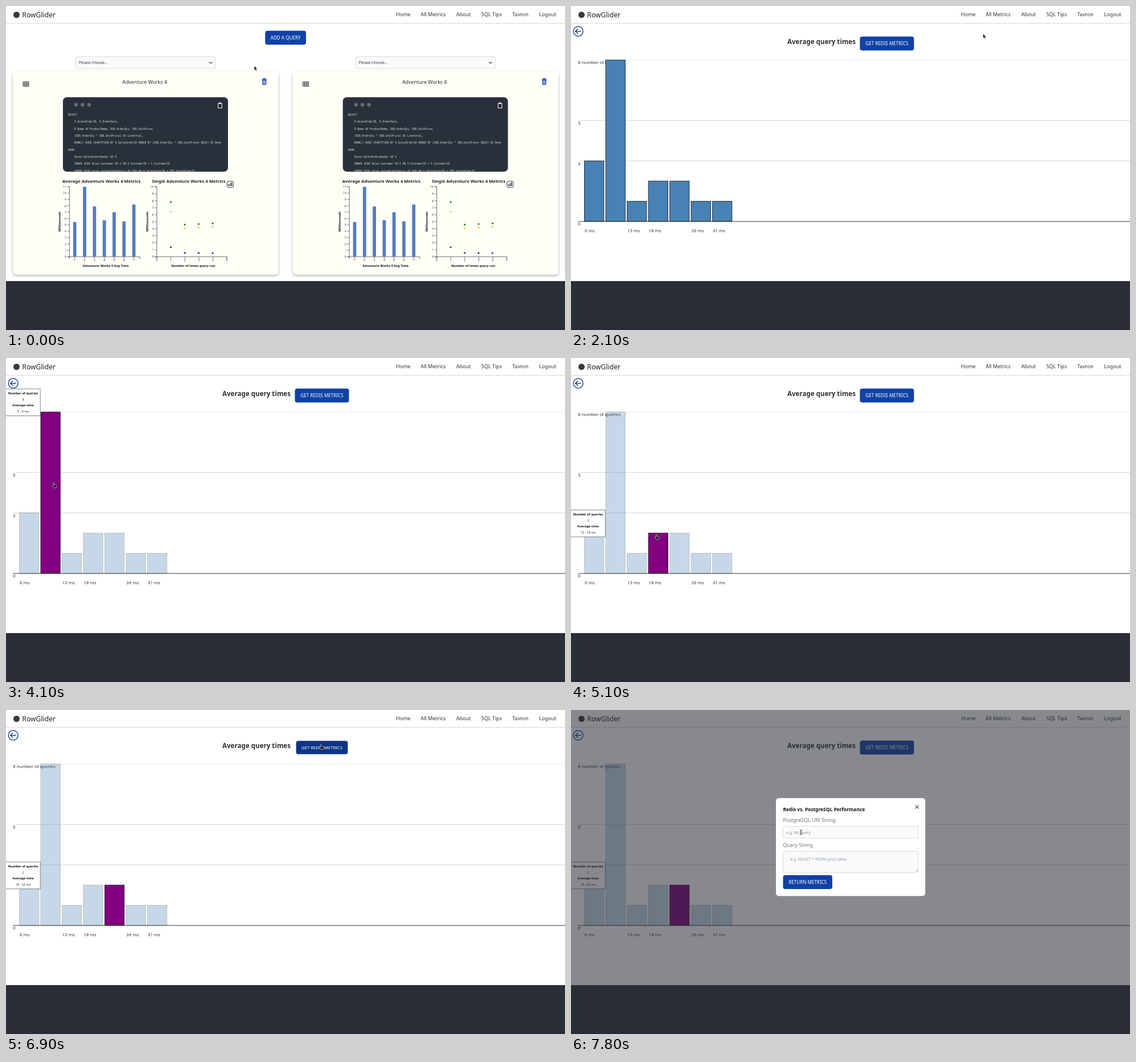
These frames come from a looping animation (982x570 px, 8 s). An HTML page:

```html
<!DOCTYPE html>
<html lang="en">
<head>
<meta charset="utf-8">
<title>Query metrics</title>
<style>
  html, body { margin: 0; height: 100%; overflow: hidden; background: #fff; }
  svg { display: block; width: 982px; height: 570px; }
  text { font-family: "Noto Sans", "Open Sans", sans-serif; white-space: pre; }
  .code { font-family: "Liberation Mono", "Noto Sans Mono", monospace; }
  .tick { font-family: "Open Sans", sans-serif; }
</style>
</head>
<body>
<svg id="stage" viewBox="0 0 982 570"></svg>
<script>
const LOOP = 8000, BLUE = '#1041a6', INK = '#2d3138';

// Markup helpers
const text = (x, y, s, size, { fill = INK, weight = 400, anchor = 'start', more = '' } = {}) =>
  `<text x="${x}" y="${y}" font-size="${size}" fill="${fill}" font-weight="${weight}" text-anchor="${anchor}" ${more}>${s}</text>`;
const mid = (x, y, s, size, o = {}) => text(x, y, s, size, { anchor: 'middle', ...o });
const rect = (x, y, w, h, fill, more = '') =>
  `<rect x="${x}" y="${y}" width="${w}" height="${h}" fill="${fill}" ${more}/>`;
const path = (d, stroke = INK, width = 1, more = '') =>
  `<path d="${d}" fill="none" stroke="${stroke}" stroke-width="${width}" ${more}/>`;
const dot = (x, y, r, fill) => `<circle cx="${x}" cy="${y}" r="${r}" fill="${fill}"/>`;
const group = (id, body, more = '') => `<g id="${id}" ${more}>${body}</g>`;
const range = n => [...Array(n).keys()];
const button = (x, y, w, label) =>
  rect(x, y, w, 24.5, BLUE, 'rx="4"') +
  mid(x + w / 2, y + 15.3, label, 8.1, { fill: '#fff', weight: 500 });
const field = (x, y, w, h) => rect(x, y, w, h, '#f9fafb', 'rx="3" stroke="#d1d5db" stroke-width=".8"');

// Dashboard
const SQL = [
  'SELECT', '>S.SalesOrderID, S.OrderDate,',
  '>P.Name AS ProductName, SOD.OrderQty, SOD.UnitPrice,',
  '>(SOD.OrderQty * SOD.UnitPrice) AS LineTotal,',
  '>RANK() OVER (PARTITION BY S.SalesOrderID ORDER BY (SOD.OrderQty * SOD.UnitPrice) DESC) AS Rank',
  'FROM', '>Sales.SalesOrderHeader AS S',
  '>INNER JOIN Sales.Customer AS C ON S.CustomerID = C.CustomerID',
  '>INNER JOIN Sales.SalesOrderDetail AS SOD ON S.SalesOrderID = SOD.SalesOrderID'
];

function axes(x0, x1, yMax, xs, firstLabel) {
  const step = 123 / yMax;
  let out = path(`M${x0 - 4} 318H${x0}V441H${x0 - 4}M${x0} 445V441H${x1}V445`, '#333', .7);
  for (const i of range(yMax + 1)) {
    const y = 441 - i * step;
    out += path(`M${x0 - 4} ${y}H${x0}`, '#333', .6) +
      text(x0 - 5.5, y + 2, i, 5.2, { anchor: 'end', more: 'class="tick"' });
  }
  xs.forEach((x, i) => {
    out += path(`M${x} 441V445`, '#333', .6) + mid(x, 449.3, i + firstLabel, 5.2, { more: 'class="tick"' });
  });
  return out;
}

function axisNames(x, yLabelX, label) {
  const bold = { weight: 700, fill: '#111' };
  return mid(x, 458.7, label, 5.65, bold) +
    mid(0, 0, 'Milliseconds', 5.7, { ...bold, more: `transform="translate(${yLabelX} 379.5) rotate(-90)"` });
}

function card() {
  const barX = range(7).map(i => 120.8 + 17.3 * i);
  const bars = [5.45, 11, 7.9, 5.73, 6.98, 5.55, 8.2];
  const runs = [['green', 345, 384.5, 383.5, 382.5], ['#f5c40f', 361.5, 391, 389.5, 388.5],
    ['#1041a6', 424.5, 434.3, 434.7, 434.8]];
  const heading = { weight: 600, fill: '#222' };
  return field(122.5, 89, 245.5, 21) + text(128, 102, 'Please choose...', 6.8) +
    path('M357 98.3l2.6 2.6 2.6-2.6', '#444', 1.2) +
    rect(12, 115, 467, 357.5, '#fffff7', 'rx="7" filter="url(#shadow)"') +
    path('M30 133.5h10v7.8h-10zM30 136h10M30 138.6h10M33.3 133.5v7.8M36.7 133.5v7.8', '#333', 1) +
    mid(243.5, 136.5, 'Adventure Works 4', 8.8) +
    path('M449.3 129.6h9M452 129v-1h3.6v1', BLUE, 1.3) +
    path('M450.8 131.4h6l-.5 6.3h-5z', BLUE, 1.4) + path('M453 131v6M454.8 131v6', BLUE, .7) +
    rect(100, 160.5, 290, 131, '#2a303a', 'rx="7"') +
    [123, 134.5, 146].map(x => dot(x, 173.7, 3.2, '#666b74')).join('') +
    path('M372.7 171.3h6.6v8.2h-6.6z', '#fff', 1, 'stroke-linejoin="round"') +
    rect(374.3, 169.8, 3.4, 2.4, '#fff', 'rx=".6"') +
    `<g clip-path="url(#codeBox)">` + SQL.map((s, i) =>
      text(s[0] === '>' ? 120 : 108.8, 193 + i * 12.32, s.replace('>', ''), 4.59,
        { fill: '#e3e5e8', more: 'class="code"' })).join('') + '</g>' +
    mid(167.7, 311, 'Average Adventure Works 4 Metrics', 7.7, heading) +
    axes(111.5, 235, 11, barX, 1) +
    bars.map((v, i) => rect(barX[i] - 2.9, 441 - v * 11.18, 5.8, v * 11.18, '#557cc0')).join('') +
    axisNames(175, 96.3, 'Adventure Works 4 Avg Time') +
    mid(321, 311, 'Single Adventure Works 4 Metrics', 7.7, heading) +
    axes(265, 388, 10, range(6).map(i => 265 + 24.6 * i), 0) +
    runs.map(([c, ...ys]) => ys.map((y, i) => dot(289.5 + 24.5 * i, y, 1.6, c)).join('')).join('') +
    axisNames(329, 249.7, 'Number of times query run') +
    rect(388.4, 308.3, 11, 11, '#fff', 'rx="2.5" stroke="#333"') +
    path('M391.3 317v-3.5M393.9 317v-5M396.5 317v-7', '#222', 1.4);
}

const dashboard = group('dashboard', button(455.3, 43.4, 71.7, 'ADD A QUERY') +
  group('card', card()) + '<use href="#card" x="491.7"/>');

// Histogram page
const COUNTS = [3, 8, 1, 2, 2, 1, 1], UNIT = 35.5, BASE = 379;
const gridLabels = [[8, '8 number of queries'], [5, '5'], [3, '3'], [0, '0']];
const timeLabels = [[0, '0 ms'], [2, '13 ms'], [3, '18 ms'], [5, '26 ms'], [6, '31 ms']];

const tooltip = group('tip',
  rect(-1, .3, 61.2, 47.4, '#fff', 'stroke="#777" stroke-width=".9"') +
  mid(30, 9.9, 'Number of queries', 5.6, { weight: 700, fill: '#111' }) +
  mid(30, 21.2, '', 5.6, { more: 'id="tipCount"' }) +
  mid(30, 30.5, 'Average time', 5.6, { weight: 700, fill: '#111' }) +
  mid(30, 42, '', 5.6, { more: 'id="tipTime"' }));

const metrics = group('metrics',
  `<circle cx="12.7" cy="44.5" r="8.5" fill="none" stroke="${BLUE}" stroke-width="1.4"/>` +
  path('M18 44.5H8M12 40.3L7.8 44.5L12 48.7', BLUE, 1.4) +
  text(380, 67, 'Average query times', 11.6, { weight: 600 }) +
  group('redis', button(507.5, 53.8, 95, 'GET REDIS METRICS')) +
  gridLabels.map(([n, s]) => {
    const y = BASE - n * UNIT;
    return (n ? path(`M12.5 ${y}H982`, n === 8 ? '#ebebeb' : '#dadada', 1) : '') +
      text(12.3, y + 7, s, 7.8);
  }).join('') +
  timeLabels.map(([i, s]) => text(24 + 37.5 * i, 398.3, s, 7.8)).join('') +
  COUNTS.map((n, i) => rect(23.5 + 37.5 * i, BASE - n * UNIT, 34.3, n * UNIT, 'steelblue',
    'class="bar" stroke="#222" stroke-width=".9"')).join('') +
  path(`M12.5 ${BASE}H982`, '#333', 1) + tooltip);

// Dialog
const label = { weight: 500, fill: '#6b7280' }, hint = { fill: '#8f96a1' };
const dialog = group('shade', rect(0, 0, 982, 570, '#2a2e37', 'opacity=".56"')) +
  group('dialog', rect(360, 155, 262.3, 172.3, '#fff', 'rx="5"') +
    path('M605 167.7l5.8 5.8M610.8 167.7l-5.8 5.8', '#444', 1.1) +
    text(372.5, 178, 'Redis vs. PostgreSQL Performance', 8.45, { weight: 700, fill: '#111' }) +
    text(372.5, 196.5, 'PostgreSQL URI String', 8.8, label) +
    field(372.5, 204.5, 237.3, 21) + text(378, 217.5, 'e.g. My query', 6.8, hint) +
    text(372.5, 240.7, 'Query String', 8.8, label) +
    field(372.5, 248.5, 237.3, 37.8) + text(385, 264.5, 'e.g. SELECT * FROM your_table', 6.9, hint) +
    path('M604.5 285l4.5-4.5M607 285l2-2', '#777', .6) +
    button(372.5, 290.5, 86.5, 'RETURN METRICS'));

const nav = [[685.3, 'Home'], [728.5, 'All Metrics'], [791, 'About'], [835, 'SQL Tips'], [889.3, 'Tavron'], [936.5, 'Logout']];
const header = path('M0 30.5H982', '#d9d9d9', 1) + dot(18.5, 15.5, 5.5, '#3a3a3a') +
  text(28.3, 19.8, 'RowGlider', 12.2, { weight: 500, fill: '#222' }) +
  rect(720, 3, 61.3, 24, '#e6e7e8', 'rx="4" id="navHover"') +
  nav.map(([x, s]) => text(x, 18.4, s, 9)).join('');

const pointers =
  group('arrow', '<path d="M0 0V8.3L1.9 6.6L3.2 9.5L4.6 8.9L3.3 6.1H5.8Z" fill="#222" stroke="#fff" stroke-width=".6"/>') +
  group('hand', '<path d="M-.9 .6Q0-.4 .8 .6V3.6L4.2 4.4Q5.1 4.8 4.9 6L4.2 9.2H-.3L-3 5.8Q-2.6 4.6-.9 5.8Z" fill="#222" stroke="#ddd" stroke-width=".6"/>') +
  group('beam', path('M-1.6-4Q0-4 0-3Q0-4 1.6-4M0-3V3M-1.6 4Q0 4 0 3Q0 4 1.6 4', '#222', 1));

document.getElementById('stage').innerHTML =
  `<defs><clipPath id="codeBox"><rect x="100" y="160" width="290" height="131.3"/></clipPath>
   <filter id="shadow" x="-5%" y="-5%" width="110%" height="112%">
   <feDropShadow dx="0" dy="2" stdDeviation="2.2" flood-opacity=".32"/></filter></defs>` +
  rect(0, 0, 982, 570, '#fff') + header + dashboard + metrics +
  rect(0, 484, 982, 86, '#2a2e37') + rect(0, 567, 982, 3, '#272b33') + dialog + group('pointer', pointers);

// Motion
const PATH = [[100, 436, 105], [1000, 566, 71.5], [1500, 737, 18], [1950, 737, 18], [2500, 689, 130],
  [2700, 689, 130], [3000, 182, 203], [3300, 92, 214], [3600, 84, 219], [4100, 84, 219], [4600, 150, 310],
  [5100, 150, 310], [5600, 181, 314], [5850, 181, 314], [6500, 553, 60], [7050, 553, 60],
  [7500, 456, 158], [7800, 404, 215]];
const HOVERS = [[3250, 1, '5 - 9 ms'], [4550, 3, '13 - 18 ms'], [5400, 4, '18 - 22 ms']];

const $ = id => document.getElementById(id);
const show = (id, on) => $(id).style.display = on ? '' : 'none';
const bars = document.querySelectorAll('.bar');

function pointerAt(t) {
  const i = PATH.findIndex(k => k[0] > t);
  if (i === 0) return PATH[0].slice(1);
  if (i < 0) return PATH.at(-1).slice(1);
  const [t0, x0, y0] = PATH[i - 1], [t1, x1, y1] = PATH[i], p = (t - t0) / (t1 - t0);
  return [x0 + (x1 - x0) * p, y0 + (y1 - y0) * p];
}

function draw(t) {
  const [x, y] = pointerAt(t);
  const within = (l, top, r, b) => x >= l && x <= r && y >= top && y <= b;
  const onPage = t >= 2000, open = Math.max(0, Math.min(1, (t - 6980) / 220));
  const onNav = within(720, 3, 781, 27);
  const onRedis = onPage && !open && within(507, 54, 603, 79);
  const onBar = onPage && !open && COUNTS.some((n, i) =>
    within(23 + 37.5 * i, BASE - n * UNIT, 58 + 37.5 * i, BASE));

  show('dashboard', !onPage);
  show('metrics', onPage);
  show('navHover', onNav);

  const hover = HOVERS.findLast(h => t >= h[0]);
  bars.forEach((bar, i) => {
    const active = hover && hover[1] === i;
    bar.setAttribute('fill', active ? 'purple' : 'steelblue');
    bar.setAttribute('opacity', !hover || active ? 1 : .3);
  });
  show('tip', hover);
  if (hover) {
    const n = COUNTS[hover[1]];
    $('tip').setAttribute('transform', `translate(0 ${BASE - n * UNIT - 41})`);
    $('tipCount').textContent = n;
    $('tipTime').textContent = hover[2];
  }

  const press = t >= 6700 && t < 6980 ? .955 : 1;
  $('redis').setAttribute('transform', `translate(555 66) scale(${press}) translate(-555 -66)`);
  $('redis').firstChild.setAttribute('fill', onRedis ? '#0d3486' : BLUE);

  const scale = .9 + .1 * open;
  for (const id of ['shade', 'dialog']) $(id).setAttribute('opacity', open);
  $('dialog').setAttribute('transform', `translate(491 241) scale(${scale}) translate(-491 -241)`);

  const onInput = open && within(372, 204, 610, 226);
  const kind = onInput ? 'beam' : onNav || onRedis || onBar ? 'hand' : 'arrow';
  for (const id of ['arrow', 'hand', 'beam']) show(id, id === kind);
  $('pointer').setAttribute('transform', `translate(${x} ${y})`);
}

const start = performance.now();
(function tick() {
  draw((performance.now() - start) % LOOP);
  requestAnimationFrame(tick);
})();
</script>
</body>
</html>
```
